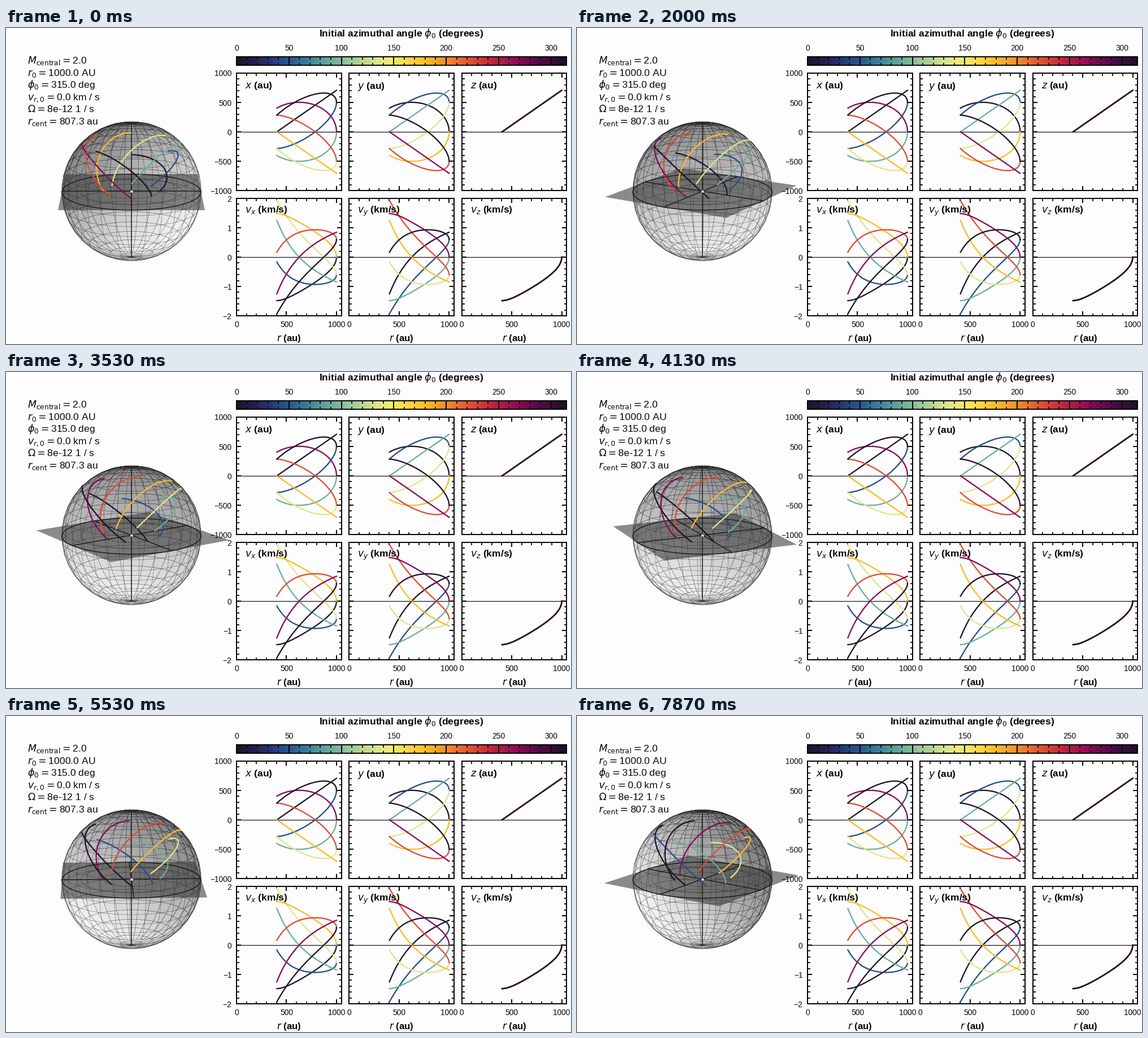
A matplotlib script for the animation above (8000 ms loop, 1000x560 px).

```python
import numpy as np
import matplotlib.pyplot as plt
from matplotlib.animation import FuncAnimation
from matplotlib.collections import LineCollection, PolyCollection
from matplotlib.colors import LinearSegmentedColormap
from matplotlib.ticker import MultipleLocator

W, H, PX = 1000, 560, 0.72          # PX: points per pixel at 100 dpi
INK, DARK, PAPER = "#060606", "#1c1c1c", "#fdfdfe"

plt.rcParams["font.family"] = "Liberation Sans"
plt.rcParams["text.color"] = INK

fig = plt.figure(figsize=(10, 5.6), dpi=100, facecolor=PAPER)

cmap = LinearSegmentedColormap.from_list("azimuth", [
    (0, "#1d1528"), (15 / 315, "#231f48"), (30 / 315, "#23346f"),
    (50 / 315, "#29588f"), (70 / 315, "#438598"), (90 / 315, "#6cad9c"),
    (110 / 315, "#a2c998"), (135 / 315, "#e0e68c"), (150 / 315, "#f7ea66"),
    (165 / 315, "#fbd540"), (180 / 315, "#fbbd2a"), (200 / 315, "#f28d2a"),
    (225 / 315, "#de4c34"), (245 / 315, "#bd2343"), (270 / 315, "#8a0a55"),
    (290 / 315, "#500d47"), (1, "#1d1228")])

# Ballistic infall from rest in r, rotating at OMEGA: an ellipse with focus at the star
R0, R_CENT, THETA, OMEGA = 1000.0, 807.3, np.pi / 4, 8e-12
AU_KM = 1.495979e8
V0 = OMEGA * R0 * AU_KM * np.sin(THETA)      # km/s
P = R_CENT * np.sin(THETA) ** 2
ECC = 1 - P / R0
PSI = np.linspace(0, np.pi / 2, 90)
PHIS = np.arange(0, 360, 45)
RAD = P / (1 - ECC * np.cos(PSI))


def streamline(phi):
    f = np.radians(phi)
    u = np.array([np.sin(THETA) * np.cos(f), np.sin(THETA) * np.sin(f), np.cos(THETA)])
    w = np.array([-np.sin(f), np.cos(f), 0])
    c, s = np.cos(PSI)[:, None], np.sin(PSI)[:, None]
    out, along = c * u + s * w, c * w - s * u
    h = R0 * V0
    vel = -(h / P) * ECC * s * out + (h / RAD)[:, None] * along
    return RAD[:, None] * out, vel


paths = [streamline(p) for p in PHIS]
colors = [cmap(p / 315) for p in PHIS]


def add_axes(x, y, w, h):
    ax = fig.add_axes([x / W, 1 - (y + h) / H, w / W, h / H], facecolor="none")
    for spine in ax.spines.values():
        spine.set(linewidth=2 * PX, color=INK)
    ax.tick_params(which="both", direction="in", top=True, right=True,
                   color=INK, labelcolor=INK, labelsize=13.7 * PX)
    ax.tick_params(which="major", length=8 * PX, width=2 * PX, pad=8.5 * PX)
    ax.tick_params(which="minor", length=4.5 * PX, width=1.8 * PX)
    return ax


def pixel_text(x, y, s, size=17.5, **kw):
    return fig.text(x / W, 1 - y / H, s, fontsize=size * PX, **kw)


def draw_panel(row, col):
    left = 408 + 199.3 * col
    ax = add_axes(left, 80 + 222 * row, 185.8, 208)
    lim = (1000, 2)[row]
    ax.set(xlim=(0, 1050), ylim=(-lim, lim))
    ax.axhline(0, color=DARK, lw=1.3 * PX, zorder=1)
    for path, color in zip(paths, colors):
        ax.plot(RAD, path[row][:, col], color=color, lw=2.3 * PX)
    ax.xaxis.set_major_locator(MultipleLocator(500))
    ax.xaxis.set_minor_locator(MultipleLocator(100))
    ax.yaxis.set_major_locator(MultipleLocator((500, 1)[row]))
    ax.yaxis.set_minor_locator(MultipleLocator((100, 0.2)[row]))
    ax.yaxis.set_major_formatter(lambda v, _: f"{v:.0f}".replace("-", "\u2212"))
    ax.tick_params(labelleft=col == 0, labelbottom=row == 1)
    name = "xyz"[col]
    label = (f"${name}$ (au)", f"$v_{name}$ (km/s)")[row]
    pixel_text(left + 15, (107.5, 327.5)[row], label, weight="bold")
    if row:
        pixel_text(left + 93, 555, "$r$ (au)", 16.9, weight="bold", ha="center")


def draw_colorbar():
    ax = add_axes(408, 51, 584.4, 15)
    ax.imshow(np.linspace(0, 1, 512)[None, :], cmap=cmap, aspect="auto",
              extent=(0, 315, 0, 1))
    ax.set_yticks([])
    ax.xaxis.set_major_locator(MultipleLocator(50))
    ax.xaxis.set_minor_locator(MultipleLocator(10))
    ax.tick_params(labeltop=True, labelbottom=False)
    pixel_text(700, 15, r"Initial azimuthal angle $\phi_0$ (degrees)",
               weight="bold", ha="center")


def draw_parameters():
    rows = [r"$M_\mathrm{central}=$2.0", "$r_0=$1000.0 AU", r"$\phi_0=$315.0 deg",
            "$v_{r,0}=$0.0 km / s", r"$\Omega=$8e-12 1 / s",
            r"$r_\mathrm{cent}=$807.3 au"]
    for i, row in enumerate(rows):
        pixel_text(37.5, 63 + 21.6 * i, row)


def freeze():
    """Flatten everything drawn so far into one transparent overlay."""
    fig.patch.set_alpha(0)
    fig.canvas.draw()
    overlay = np.array(fig.canvas.buffer_rgba())
    for artist in fig.axes + fig.texts:
        artist.remove()
    fig.patch.set_alpha(1)
    fig.figimage(overlay, zorder=10)


for row in range(2):
    for col in range(3):
        draw_panel(row, col)
draw_colorbar()
draw_parameters()
freeze()

# Rotating scene, in units of the sphere radius
CX, CY, RADIUS, DIST = 222, 289.2, 123, 18.2
ELEV = np.radians(15)


def project(p, azim):
    """Perspective view of points (..., 3): pixel positions and nearness."""
    a = np.radians(azim)
    x, y, z = np.moveaxis(np.asarray(p, float), -1, 0)
    front = x * np.cos(a) + y * np.sin(a)
    side = y * np.cos(a) - x * np.sin(a)
    near = front * np.cos(ELEV) + z * np.sin(ELEV)
    up = z * np.cos(ELEV) - front * np.sin(ELEV)
    k = RADIUS * DIST / (DIST - near)
    return np.stack([CX + k * side, CY - k * up], -1), near


def ring(r, n=121):
    t = np.linspace(0, 2 * np.pi, n)
    return np.stack([r * np.cos(t), r * np.sin(t), 0 * t], -1)


lon, lat = np.mgrid[0:2 * np.pi:30j, 0:np.pi:20j]
grid = np.stack([np.cos(lon) * np.sin(lat), np.sin(lon) * np.sin(lat), np.cos(lat)], -1)
quads = np.stack([grid[:-1, :-1], grid[1:, :-1], grid[1:, 1:], grid[:-1, 1:]], 2)
quads = quads.reshape(-1, 4, 3)
centers = quads.mean(1)
normals = centers / np.linalg.norm(centers, axis=1, keepdims=True)
shade = 0.1 + 0.45 * (1 + normals @ np.array([0.56, 0.56, -0.61]))
faces = np.column_stack([shade, shade, shade, np.full_like(shade, 0.35)])

square = np.array([[1, 1, 0], [-1, 1, 0], [-1, -1, 0], [1, -1, 0]])
frame_lines = [ring(1)] + [np.outer([-1, 1], axis) for axis in np.eye(3)]
dotted_rings = [ring(0.73), ring(0.4)]
flights = [pos / R0 for pos, _ in paths]

ax = fig.add_axes([0, 0, 1, 1])
ax.set(xlim=(0, W), ylim=(H, 0))
ax.axis("off")


def add_lines(width, z, **kw):
    return ax.add_collection(LineCollection([], linewidths=width * PX, zorder=z, **kw),
                             autolim=False)


ball = ax.add_collection(PolyCollection([], edgecolors="none", antialiaseds=False,
                                        zorder=1), autolim=False)
mesh = add_lines(0.7, 2, colors=DARK, alpha=0.5)
plane = ax.add_collection(PolyCollection([], facecolors=(0.22, 0.22, 0.22, 0.58),
                                         edgecolors="none", zorder=3), autolim=False)
dots = add_lines(1.2, 4, colors=DARK, linestyles=(0, (1, 2)))
solid = add_lines(1.5, 5, colors=DARK)
trails = add_lines(2.3, 6, colors=colors)
ax.add_patch(plt.Circle((CX, CY), RADIUS, fill=False, ec=DARK, lw=0.9 * PX,
                        alpha=0.6, zorder=2))
ax.plot(CX, CY, "*", ms=9 * PX, mfc="white", mec=DARK, mew=0.5 * PX, zorder=7)

INTERVAL, LOOP = 50, 8000
STARTS = [0, 130, 270, 400, 530, 600, 730, 870]   # eight uneven holds per second


def step_at(ms):
    return 8 * (ms // 1000) + np.searchsorted(STARTS, ms % 1000, "right") - 1


def update(i):
    azim = 2 * step_at(i * INTERVAL + 30)

    def flat(lines):
        return [project(line, azim)[0] for line in lines]

    order = np.argsort(project(centers, azim)[1])
    ball.set_verts(project(quads[order], azim)[0])
    ball.set_facecolor(faces[order])
    net = project(grid, azim)[0]
    mesh.set_segments(list(net[:-1]) + list(net.swapaxes(0, 1)[1:-1]))
    plane.set_verts(flat([square]))
    dots.set_segments(flat(dotted_rings))
    solid.set_segments(flat(frame_lines))
    trails.set_segments(flat(flights))
    return ball, mesh, plane, dots, solid, trails


anim = FuncAnimation(fig, update, frames=LOOP // INTERVAL, interval=INTERVAL,
                     repeat=True, repeat_delay=0, blit=False)
plt.show()
```
